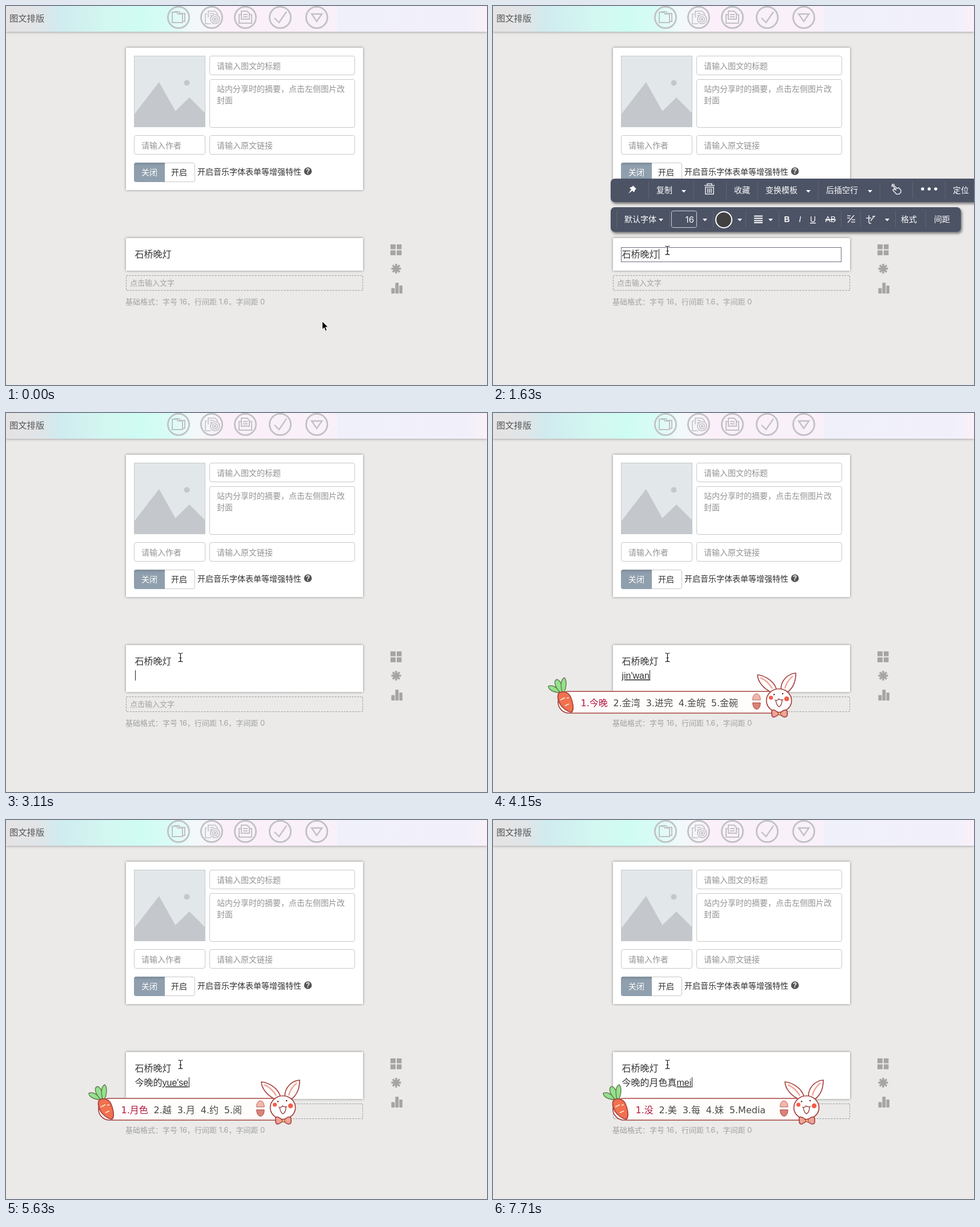
Write an HTML page that moves like this. It is 842 px wide and 663 px high and loops after 8000 ms.

```html
<!DOCTYPE html>
<html lang="zh-CN">
<head>
<meta charset="utf-8">
<title>图文排版</title>
<style>
html, body { margin: 0; width: 100%; height: 100%; overflow: hidden; background: #ebeae9; }
svg { display: block; width: 100vw; height: 100vh; }
text { font: 14px "Liberation Sans", "Noto Sans CJK SC", "Noto Sans CJK", sans-serif; white-space: pre; }
.card { fill: #fff; filter: drop-shadow(0 0 2px rgba(0,0,0,.45)); }
.field { fill: #fff; stroke: #c8c8c8; }
.hint text { fill: #939393; }
.small text { font-size: 13px; fill: #a2a2a2; font-family: Inter, "Noto Sans CJK SC", "Noto Sans CJK", sans-serif; }
.body text { font-size: 16px; fill: #333; }
.line { fill: none; stroke: #c0c2c4; stroke-width: 2; }
.bar { fill: #4c5365; filter: drop-shadow(2px 3px 2px rgba(0,0,0,.5)); }
.sep { stroke: #626470; }
#tools text { fill: #fff; }
.icon { fill: none; stroke: #e6e8ec; stroke-width: 1.6; }
#typing { text-decoration: underline; text-decoration-skip-ink: none; }
#words text { font: 16px "DejaVu Sans", "Noto Sans CJK SC", "Noto Sans CJK", sans-serif; fill: #484848; }
#words text:first-child { fill: #b5163f; }
#words .badge { font-size: 14px; font-weight: bold; fill: #fff; }
.red { stroke: #a5413d; stroke-width: 1.7; stroke-linejoin: round; }
</style>
</head>
<body>
<svg viewBox="0 0 842 663" preserveAspectRatio="none">
  <defs>
    <linearGradient id="sky" gradientUnits="userSpaceOnUse" x1="0" x2="842" y1="0" y2="0">
      <stop offset="0" stop-color="#e5e3e3"/>
      <stop offset=".07" stop-color="#e0e5e8"/>
      <stop offset=".11" stop-color="#d0ebef"/>
      <stop offset=".21" stop-color="#d3f7f1"/>
      <stop offset=".28" stop-color="#cefcf3"/>
      <stop offset=".34" stop-color="#d9fbf5"/>
      <stop offset=".39" stop-color="#f2f9fa"/>
      <stop offset=".45" stop-color="#fbf0f9"/>
      <stop offset=".688" stop-color="#f9f0fa"/>
      <stop offset=".689" stop-color="#f0f0fb"/>
      <stop offset=".96" stop-color="#f1f0fa"/>
      <stop offset="1" stop-color="#faf0f8"/>
    </linearGradient>
    <linearGradient id="pressed" x2="0" y2="1">
      <stop offset="0" stop-color="#7c8b99"/>
      <stop offset=".18" stop-color="#8f9fad"/>
    </linearGradient>
    <path id="tri" d="M-4-2h8l-4 4.5z" fill="#fff"/>
  </defs>
  <rect width="842" height="663" fill="#ebeae9"/>

  <!-- header -->
  <rect width="842" height="45" fill="url(#sky)" style="filter:drop-shadow(0 1px 2px rgba(0,0,0,.3))"/>
  <text x="6" y="27" style="font-size:15.3px" fill="#555">图文排版</text>
  <g class="line">
    <g id="rings" stroke-width="2.8"></g>
    <path d="M291 29V11h8l2 3h8v15zM295 11v-1h8l2 3h8v14h-4"/>
    <path d="M354 20V9h12l4 4v3M352 14h-3v17h10M357 13h7M357 17h5" stroke-width="1.6"/>
    <circle cx="366" cy="23" r="8" stroke-width="1.6"/>
    <circle cx="366" cy="23" r="4.5" stroke-width="1.6"/>
    <circle cx="366" cy="23" r="1.5" stroke-width="1.6"/>
    <path d="M412 23V9h10l4 4v10zM412 15h-4v15h22V15h-4M415 15h8M415 19h8"/>
    <path d="M470 21l8 8 13-19" stroke-width="2.4"/>
    <path d="M535 14h18l-9 13z" stroke-width="2.4"/>
  </g>

  <!-- article form -->
  <rect class="card" x="210" y="73" width="415" height="249"/>
  <rect x="224.5" y="87.5" width="124" height="124" fill="#e2e7ea" stroke="#c5c9cc"/>
  <path d="M224 190l44-57 28.500 51 24.500-24 28 28v24H224z" fill="#c4c8cc"/>
  <circle cx="316.500" cy="134.500" r="5" fill="#c4c8cc"/>
  <g class="field">
    <rect x="356.500" y="87.500" width="254" height="33" rx="3.500"/>
    <rect x="356.500" y="128.500" width="254" height="84" rx="3.500"/>
    <rect x="224.500" y="226.500" width="124" height="33" rx="3.500"/>
    <rect x="356.500" y="226.500" width="254" height="33" rx="3.500"/>
    <rect x="224.500" y="274.500" width="106" height="33" rx="3.500"/>
  </g>
  <g class="hint">
    <text x="369" y="110">请输入图文的标题</text>
    <text x="369" y="150">站内分享时的摘要，点击左侧图片改</text>
    <text x="369" y="170">封面</text>
    <text x="237" y="249">请输入作者</text>
    <text x="369" y="249">请输入原文链接</text>
  </g>
  <path d="M278 274v34h-50q-4 0-4-4v-26q0-4 4-4z" fill="url(#pressed)"/>
  <text x="237" y="296" fill="#fff">关闭</text>
  <text x="289" y="296" fill="#333">开启</text>
  <text x="335" y="295" fill="#333">开启音乐字体表单等增强特性</text>
  <circle cx="528.500" cy="289" r="6.800" fill="#555"/>
  <text x="528.500" y="293.300" text-anchor="middle" fill="#fff" style="font-size:12px;font-weight:bold">?</text>

  <!-- editor -->
  <rect id="page" class="card" x="210" y="406" width="415" height="57"/>
  <g id="below">
    <rect x="210.500" y="471.500" width="414" height="26" fill="none" stroke="#999" stroke-dasharray="3 2"/>
    <g class="small">
      <text x="217" y="489">点击输入文字</text>
      <text x="209" y="522">基础格式：字号 16，行间距 1.6，字间距 0</text>
    </g>
  </g>
  <g class="body">
    <text x="225.500" y="440">石桥晚灯</text>
    <text id="line" x="225.500" y="465"><tspan id="done"></tspan><tspan id="typing"></tspan></text>
  </g>
  <rect id="focus" x="224.500" y="422.500" width="385" height="25" fill="none" stroke="#6f6c80"/>
  <rect id="caret" width="1" height="18" fill="#222"/>

  <!-- side icons -->
  <g fill="#a5a5a5">
    <path d="M673 417h9v8.500h-9zM684 417h8.500v8.500H684zM673 427.500h9v8.500h-9zM684 427.500h8.500v8.500H684z"/>
    <path d="M683 451v17M674.500 459.500h17M677 453.500l12 12M689 453.500l-12 12" stroke="#a5a5a5" stroke-width="3.400"/>
    <rect x="674.500" y="493.500" width="6" height="9.500" rx="1"/>
    <rect x="681.500" y="484" width="5.800" height="19" rx="1"/>
    <rect x="688.500" y="489" width="5.500" height="14" rx="1"/>
  </g>

  <!-- format bars -->
  <g id="tools">
    <rect class="bar" x="206" y="302" width="660" height="41" rx="7"/>
    <rect class="bar" x="206" y="352" width="613" height="43" rx="7"/>
    <g id="marks"></g>
    <text x="286" y="327">复制</text>
    <text x="422" y="327">收藏</text>
    <text x="477" y="327">变换模板</text>
    <text x="583" y="327">后插空行</text>
    <text x="805" y="327">定位</text>
    <text x="230" y="378">默认字体</text>
    <text x="714" y="378">格式</text>
    <text x="772" y="378">间距</text>
    <path d="M245 314l6 6-2 1-2 5-3-3-7 5 5-7-3-3 5-2z" fill="#fff"/>
    <path class="icon" d="M370 314h18M375 314v-3h8v3M372 317v12h14v-12zM376 319v8M379 319v8M382 319v8"/>
    <path class="icon" d="M706 329l-6-7 2-2 4 2-6-7 2-1 5 5 3-1 4 4v4l-3 3zM698 316l1-4 4 0"/>
    <g fill="#fff">
      <circle cx="752" cy="320" r="2.700"/><circle cx="763.500" cy="320" r="2.700"/><circle cx="775" cy="320" r="2.700"/>
    </g>
    <rect x="312.500" y="358.500" width="44" height="29" rx="3" fill="none" stroke="#cfd2d8"/>
    <text x="352" y="379" text-anchor="end" style="font:15px Inter,sans-serif">16</text>
    <circle cx="404" cy="374" r="14" fill="#414141" stroke="#fff" stroke-width="2"/>
    <path d="M457 367.500h15M457 371.500h15M457 375.500h15M457 379h15" stroke="#fff" stroke-width="1.800"/>
    <text x="509.500" y="378" font-weight="bold" style="font-weight:bold">B</text>
    <text x="535.500" y="378" style="font-style:italic">I</text>
    <text x="555" y="378" style="text-decoration:underline">U</text>
    <text x="581.500" y="378" style="text-decoration:line-through">AB</text>
    <path class="icon" d="M620 367h6M620 371h5M621 379l11-13M628 374h6M627 378h7"/>
    <path class="icon" d="M658 366v12q0 3 4 2M653 371h9M661 376l7-9M664 368l5 0" stroke-width="2.200"/>
  </g>

  <!-- candidate window -->
  <g id="ime">
    <rect id="strip" class="red" x="18" y="487" height="38" rx="19" fill="#fffdfc"/>
    <g fill="#94e28d" stroke="#66804f" stroke-width="1.500">
      <path d="M21 489C10 489 1 484 1 478 8 475 17 480 21 489z"/>
      <path d="M22 489C11 478 10 468 16 466 22 468 27 478 25 489z"/>
      <path d="M25 489C22 476 23 466 29 463 34 468 32 482 28 490z"/>
    </g>
    <path class="red" fill="#f1714f" d="M21 489C15 492 17 505 25 514 32 521 39 524 42 523 46 518 44 506 40 497 36 488 27 486 21 489z"/>
    <path d="M22 502l8-4M30 512l7-3M33 499l4-1" fill="none" stroke="#fff0dc" stroke-width="1.500"/>
    <g id="words"></g>
    <g id="rabbit">
      <path d="M25.500 502C25 488 39 487 39 502z" fill="#f1b6ac" stroke="#b7685f"/>
      <path d="M25.500 507H39C39 522 26 522 25.500 507z" fill="#dc8278" stroke="#a5413d"/>
      <g class="red" fill="#fff">
        <path d="M57 488C45 482 34 470 34 458 49 460 63 470 67 483z"/>
        <path d="M75 483C75 468 87 456 101 455 101 468 97 480 87 488z"/>
        <ellipse cx="71.500" cy="503" rx="22" ry="20.500"/>
      </g>
      <path d="M39 463Q52 469 60 482M96 460Q84 470 82 482" fill="none" stroke="#f2a79c" stroke-width="2.500"/>
      <circle cx="57.500" cy="498" r="3.600" fill="#f45d49"/>
      <circle cx="85" cy="500" r="4.300" fill="#f45d49"/>
      <circle cx="63" cy="492.500" r="1.300" fill="#522"/>
      <circle cx="78" cy="491" r="1.300" fill="#522"/>
      <path d="M64 502q5 2 7-2 3 3 8 1M66 503C67 510 70 514 72 514 75 512 77 507 77 502" fill="none" stroke="#8d3936" stroke-width="1.300"/>
      <path class="red" fill="#eda497" d="M72 526C64 518 57 517 59 525 58 534 64 534 72 526 80 534 87 534 86 525 87 517 80 518 72 526z"/>
      <circle cx="72.500" cy="526" r="2.500" fill="#edb75f" stroke="#a5413d"/>
    </g>
  </g>

  <!-- pointer -->
  <path id="arrow" d="M0 0v14.500l3.400-3.200 2.400 5.600 2.600-1.100-2.400-5.400h4.600z" stroke="#fff"/>
  <g id="beam" fill="none">
    <path d="M-4-7.500q4 0 4 2 0-2 4-2M0-6V6M-4 7.500q4 0 4-2 0 2 4 2" stroke="#fff" stroke-width="3"/>
    <path d="M-4-7.500q4 0 4 2 0-2 4-2M0-6V6M-4 7.500q4 0 4-2 0 2 4 2M-2 1h4" stroke="#111" stroke-width="1.200"/>
  </g>
</svg>
<script>
const $ = id => document.getElementById(id);
const LOOP = 8000, STEP = 146.7, OPEN = 1480, ENTER = 2970;

function add(parent, tag, attrs, text = '') {
  const el = document.createElementNS('http://www.w3.org/2000/svg', tag);
  for (const key in attrs) el.setAttribute(key, attrs[key]);
  el.textContent = text;
  return parent.appendChild(el);
}
const move = (el, x, y) => el.setAttribute('transform', `translate(${x} ${y})`);
const show = (el, on) => el.style.display = on ? '' : 'none';

for (const cx of [302, 360, 419, 480, 544]) add($('rings'), 'circle', { cx, cy: 20, r: 18.6 });

const rows = [
  { y: 307, seps: [272, 351, 408, 463, 569, 677, 734, 791], arrowY: 324, arrows: [334, 552, 660] },
  { y: 358, seps: [216, 309, 385, 442, 500, 609, 643, 704, 757], arrowY: 374, arrows: [294, 371, 432, 486, 690] }
];
for (const row of rows) {
  for (const x of row.seps) add($('marks'), 'path', { class: 'sep', d: `M${x}.5 ${row.y}v30` });
  for (const x of row.arrows) add($('marks'), 'use', { href: '#tri', x, y: row.arrowY });
}

// time, committed text, letters being typed, candidates
const typing = [
  [0, '', '', ''],
  [3410, '', 'j', '就 将 及 即 加'],
  [3560, '', 'ji', '及 级 即 几 记'],
  [3700, '', 'jin', '进 仅 金 近 今'],
  [3850, '', "jin'w", '今晚 金湾 进 仅 金'],
  [4000, '', "jin'wa", '今晚 金湾 进 仅 金'],
  [4150, '', "jin'wan", '今晚 金湾 进完 金皖 金碗'],
  [4290, '今晚', '', ''],
  [4440, '今晚', 'd', '的 到 但 都 等'],
  [4590, '今晚', 'de', '的 得到 德 地方 的话'],
  [4740, '今晚的', '', ''],
  [5030, '今晚的', 'y', '用 有 [有] 也 要'],
  [5180, '今晚的', 'yue', '月 越 约 阅 粤语'],
  [5480, '今晚的', "yue's", '月色 约束 越是 月 越'],
  [5630, '今晚的', "yue'se", '月色 越 月 约 阅'],
  [5770, '今晚的月色', '', ''],
  [5920, '今晚的月色', 'zh', '这 中 只 张 找'],
  [6070, '今晚的月色', 'zhen', '真 帧 针 镇 阵'],
  [6210, '今晚的月色', "zhen'm", '真美 真慢 真 针 枕木'],
  [6360, '今晚的月色', 'zhen', '真 帧 针 镇 阵'],
  [6510, '今晚的月色', 'zhen', '真 真的 针 镇 阵'],
  [6660, '今晚的月色真', '', ''],
  [7260, '今晚的月色真', 'm', ''],
  [7560, '今晚的月色真', 'me', '没 么么 没有 每天 没事'],
  [7710, '今晚的月色真', 'mei', '没 美 每 妹 Media']
];

function layCandidates(list) {
  const words = $('words');
  words.replaceChildren();
  let x = 57.5, end = x;
  list.split(' ').forEach((word, i) => {
    const badge = word[0] === '[';
    const label = add(words, 'text', { x, y: 513 }, `${i + 1}.` + (badge ? '' : word));
    end = x + label.getComputedTextLength();
    if (badge) {
      add(words, 'rect', { x: end, y: 497, width: 20, height: 20, rx: 4, fill: '#f7941d' });
      add(words, 'text', { class: 'badge', x: end + 3, y: 512.3 }, word[1]);
      end += 20.5;
    }
    x = end + 9.8;
  });
  $('strip').setAttribute('width', end + 60);
  move($('rabbit'), end, 0);
}

let current;
function setTyping(state) {
  if (state === current) return;
  current = state;
  const [, done, letters, list] = state;
  $('done').textContent = done;
  $('typing').textContent = letters;
  show($('ime'), list);
  if (!list) return;
  layCandidates(list);
  move($('ime'), 96 + 16 * done.length, 0);
}

function draw(t) {
  const newline = t >= ENTER, focused = t >= OPEN && !newline;
  setTyping(typing.findLast(state => t >= state[0]));

  $('page').setAttribute('height', newline ? 82 : 57);
  move($('below'), 0, newline ? 25 : 0);
  show($('tools'), focused);
  show($('focus'), focused);

  const blinkOff = (t >= 1930 && t < 2370) || (t >= 2820 && !newline);
  show($('caret'), t >= OPEN && !blinkOff);
  const length = newline ? $('line').getComputedTextLength() : 0;
  move($('caret'), newline ? Math.floor(226.5 + length) : 290, newline ? 450 : 425);

  const steps = t < 750 ? 0 : Math.floor((t - 750) / STEP) + 1;
  const p = Math.min(1, steps / 6), eased = p * p * (3 - 2 * p);
  const x = 553 - 248 * eased, y = 551 - 124 * eased, overText = y < 450;
  show($('arrow'), !overText);
  show($('beam'), overText);
  move($(overText ? 'beam' : 'arrow'), x + .5, y + .5);
}

function tick() {
  draw(performance.now() % LOOP);
  requestAnimationFrame(tick);
}
tick();
</script>
</body>
</html>
```
